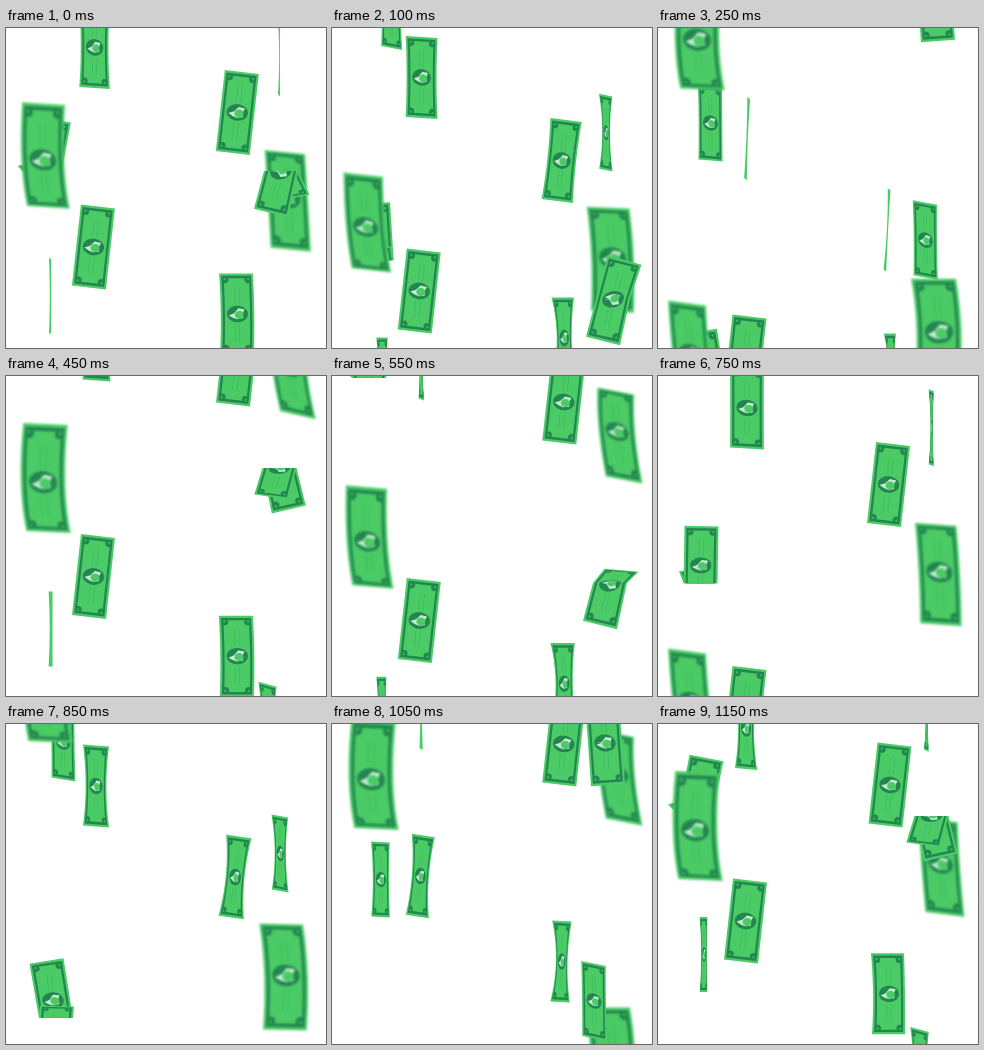
An HTML page that plays this animation: 320 px wide and 320 px high, repeating every 1.2 s.

```html
<!DOCTYPE html>
<html lang="en">
<head>
<meta charset="utf-8">
<title>Falling banknotes</title>
<style>
  html, body { margin: 0; width: 100%; height: 100%; overflow: hidden; background: #fff; }
  svg { display: block; width: 100vw; height: 100vh; }
</style>
</head>
<body>
<svg id="stage" viewBox="0 0 320 320" xmlns="http://www.w3.org/2000/svg"></svg>
<script>
const LOOP = 1200, STEP = 50, MARGIN = 100;
const RIM = '#4acb65', DARK = '#238650', FACE = '#4acb65', LINE = '#3db45a', MINT = '#c5ecd0';

const lerp = (a, b, k) => a + (b - a) * k;
const clamp = (n, lo, hi) => Math.min(hi, Math.max(lo, n));
const ramp = (n, from, to) => clamp((n - from) / (to - from), 0, 1);
const ease = k => k * k * (3 - 2 * k);

// Each note has an age in ms. Its path gives age, x and y at a few points.
// Two notes share a path; a run gives the second one's age offset and rate.
// A sheet changes from one pose to the other over a span of ages:
// scale, tilt, lean, bow, curl. Its width follows a spin that may be held.
const small = { w: 25, h: 75, blur: 0.6 };
const middle = { w: 34, h: 81 };
const large = { w: 44.5, h: 108, blur: 0.8 };

const columns = [
  { ...middle, path: [[550, 37, 2], [645, 37, 98], [690, 38, 155], [850, 50, 294], [950, 52, 389]],
    run: [-443, 0.94], hinge: 0.45, ends: swingTail },
  { ...small, path: [[850, 57, 18], [1050, 48.5, 155.5], [1200, 44, 268], [1300, 50, 347]],
    run: [689.5, 1.09], span: [850, 1100], poses: [[1, 2, 0.5, 0, 0], [1, 0, 0, 0.5, 0]],
    spin: { zero: 1210, turn: 600 }, pinch: 0.3 },
  { ...large, path: [[850, 43, -36], [1050, 43, 51], [1200, 40, 127.5], [1350, 33, 228], [1450, 34, 321]],
    run: [700, 1], span: [1150, 1350], poses: [[1, 1, 1.5, -4, 0.08], [0.85, 2.5, 5, -1, 0.1]] },
  { ...large, path: [[450, 287.5, -4], [550, 288, 59.5], [650, 283.5, 144], [850, 277, 253], [1050, 277, 338]],
    run: [-593, 1.08], span: [500, 900], poses: [[0.8, 4, 4.5, -4, -0.1], [1.01, 0, 1.5, 4, -0.02]] },
  { ...small, path: [[650, 266, -31], [722, 273, 30], [850, 274, 129.5], [1050, 262, 277], [1150, 262, 343]],
    run: [-430, 0.96], span: [750, 1000], poses: [[1, 1, 0, 0.5, 0], [1, 2.5, 0.5, 0, 0]],
    spin: { zero: 710, turn: 600 }, pinch: 0.6 },
  { ...middle, path: [[950, 277, -29], [1050, 273, 19], [1150, 273.5, 92], [1200, 275, 143], [1350, 284, 335]],
    run: [700, 1], hinge: 0, ends: tumble },
  { ...middle, path: [[450, 90.5, -36], [650, 88, 2], [850, 90, 62], [1150, 87.5, 197], [1450, 87, 329]],
    run: [-492, 1], span: [850, 1150], poses: [[1, 1, 0, 0, 0], [1, 2, -4.5, 0, 0]],
    spin: { zero: 570, turn: 388, until: 1150 }, pinch: 0.5 },
  { ...middle, path: [[450, 231.5, -12], [650, 232, 64], [850, 229, 153], [1050, 229, 237.5], [1200, 230.5, 286], [1400, 232, 334]],
    run: [-600, 1.08], span: [800, 1150], poses: [[1, 2, -4.5, 0, 0], [1, 0, 0.5, 1, 0]],
    spin: { zero: 966, turn: 434, since: 749 }, pinch: 0.6 }
];

// Both halves swing round the hinge, one after the other.
function tumble(age) {
  const k = ease(ramp(age, 1050, 1200)), late = ease(ramp(age, 1120, 1350));
  return [[-3 - 7 * k, -42 * Math.cos(Math.PI * k)],
          [3 + 8.5 * k, 42 * Math.cos(Math.PI * late)]];
}

// The note sways while its folded tail moves from the back to the front.
function swingTail(age) {
  const k = Math.cos(Math.PI * ramp(age, 650, 850));
  return [[1 + 10.5 * k, -57], [-4.5 - 5.5 * k, -14 - 2 * k], k < 0];
}

function pointAt(path, age) {
  let i = 0;
  while (i < path.length - 2 && age > path[i + 1][0]) i++;
  const a = path[i], b = path[i + 1], k = (age - a[0]) / (b[0] - a[0]);
  return [lerp(a[1], b[1], k), lerp(a[2], b[2], k)];
}

function oval(cu, cv, ru, rv) {
  return Array.from({ length: 18 }, (_, i) => {
    const a = i * Math.PI / 9;
    return [cu + ru * Math.cos(a), cv + rv * Math.sin(a)];
  });
}

// Sides are sampled so that they can bend.
function rect(u, v, cu = 0, cv = 0) {
  const side = (x, dir) =>
    Array.from({ length: 11 }, (_, i) => [cu + x, cv + dir * v * (i / 5 - 1)]);
  return [...side(-u, 1), ...side(u, -1)];
}

// Note artwork in a square from -1 to 1.
const art = [[RIM, rect(1, 1)], [DARK, rect(0.88, 0.945)], [FACE, rect(0.75, 0.885)]];
for (const u of [-1, 1]) for (const v of [-1, 1]) {
  art.push([DARK, oval(u * 0.67, v * 0.84, 0.2, 0.08)]);
  art.push([LINE, oval(u * 0.7, v * 0.86, 0.07, 0.03)]);
  art.push([LINE, rect(0.02, 0.2, u * 0.13, v * 0.46)]);
}
art.push(
  [DARK, oval(0, 0, 0.63, 0.205)],
  [MINT, [[-0.52, 0.04], [-0.2, -0.02], [0.05, -0.14], [0.42, -0.12], [0.3, 0],
          [0.35, 0.1], [0, 0.13], [-0.25, 0.1]]],
  [FACE, oval(0.1, 0.02, 0.26, 0.1)]
);

// Clamping v leaves only the part of the note between two folds.
function drawNote(map, from = -1, to = 1, layers = art) {
  return layers.map(([color, points]) => {
    const d = points.map(([u, v]) =>
      map(u, clamp(v, from, to)).map(n => n.toFixed(2)).join(' '));
    return `<path d="M${d.join('L')}Z" fill="${color}"/>`;
  }).join('');
}

function drawSheet({ path, w, h, span, poses, spin, pinch = 0 }, age) {
  const [x, y] = pointAt(path, age), k = ramp(age, ...span);
  const [scale, tilt, lean, bow, curl] = poses[0].map((n, i) => lerp(n, poses[1][i], k));
  let turn = 1;
  if (spin) {
    const { zero, turn: half, since = -Infinity, until = Infinity } = spin;
    turn = Math.max(0.08, Math.abs(Math.sin(Math.PI * (clamp(age, since, until) - zero) / half)));
  }
  const waist = pinch * (1 - turn * turn), width = w * scale * turn;
  return drawNote((u, v) => {
    const belly = 1 - v * v;
    return [x + u * width / 2 * (1 - waist * belly) + lean * v + bow * belly,
            y + (v + curl * belly) * h * scale / 2 + u * tilt];
  }, -1, 1, width < 4 ? art.slice(0, 1) : art);
}

function drawFolded({ path, w, h, hinge, ends }, age) {
  const [x, y] = pointAt(path, age), [first, second, secondOnTop] = ends(age);
  const part = ([dx, dy], end) => {
    const length = Math.abs(end - hinge) * h / 2;
    const tilt = -w / 2 * dx * dy / length ** 2;
    return drawNote((u, v) => {
      const k = (v - hinge) / (end - hinge);
      return [x + dx * k + u * w / 2, y + dy * k + u * tilt * k];
    }, Math.min(hinge, end), Math.max(hinge, end));
  };
  const parts = [part(second, 1), part(first, -1)];
  return (secondOnTop ? parts.reverse() : parts).join('');
}

function drawColumn(column, t) {
  const { path, run, blur, ends } = column;
  const born = path[0][0] - MARGIN, gone = path[path.length - 1][0] + MARGIN;
  let out = '';
  for (const [offset, rate] of [[0, 1], run]) for (const lap of [1, 0]) {
    const age = offset + rate * (t + lap * LOOP);
    if (age >= born && age <= gone) out += (ends ? drawFolded : drawSheet)(column, age);
  }
  return `<g${blur ? ` style="filter:blur(${blur}px)"` : ''}>${out}</g>`;
}

const stage = document.getElementById('stage');
let shown = -1;

function draw(t) {
  if (t === shown) return;
  shown = t;
  stage.innerHTML = columns.map(c => drawColumn(c, t)).join('');
}

function tick() {
  draw(Math.floor(performance.now() % LOOP / STEP) * STEP);
  requestAnimationFrame(tick);
}
tick();
</script>
</body>
</html>
```
